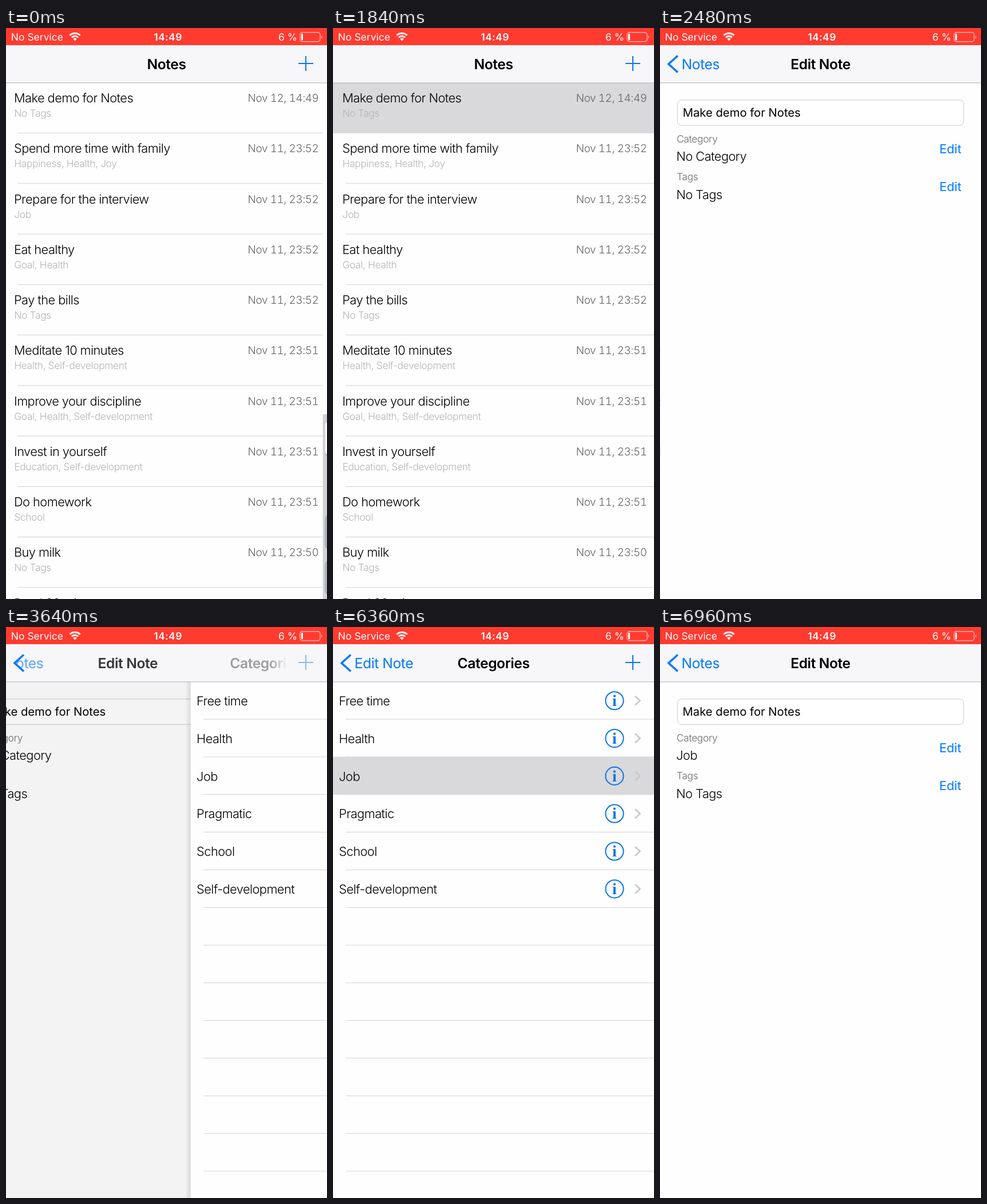
Animation, 561 px wide and 998 px high, one loop 9800 ms. Source, as an HTML page:

```html
<!DOCTYPE html>
<html lang="en">
<head>
<meta charset="utf-8">
<title>Notes demo</title>
<style>
  html, body { margin: 0; width: 100%; height: 100%; overflow: hidden; background: #fefefe; }
  svg { display: block; width: 100%; height: 100%; }
  text {
    font-family: Inter, sans-serif; font-optical-sizing: none;
    text-rendering: geometricPrecision; white-space: pre;
  }

  .light { font-size: 21.8px; font-weight: 300; letter-spacing: -.56px; }
  .small { font-size: 17.4px; letter-spacing: -.36px; }
  .tags { fill: #b4b4b6; }
  .label { fill: #6a6a6c; }
  .date {
    font-size: 18.9px; letter-spacing: -.42px; fill: #646466;
    text-anchor: end; font-variant-numeric: tabular-nums;
  }

  .title { font-size: 24.6px; font-weight: 600; letter-spacing: -.4px; text-anchor: middle; }
  .back { font-size: 24.6px; letter-spacing: -.4px; fill: #007aff; }
  .button { font-size: 21.7px; fill: #007aff; }
  .field { font-size: 20.3px; letter-spacing: -.03px; }
  .status { font-size: 17.5px; fill: #fff; }
  .clock { font-weight: 600; letter-spacing: .4px; text-anchor: middle; }
  .info { font: bold 28px "Liberation Serif", Times, serif; fill: #0a76e6; text-anchor: middle; }
  .line { fill: none; stroke: #0a76e6; stroke-width: 2; }
  .chevron { stroke: #007aff; stroke-width: 3.6; }
  .more { stroke: #c7c7cc; stroke-width: 2.6; }
</style>
</head>
<body>
<svg id="stage" viewBox="0 0 561 998" xmlns="http://www.w3.org/2000/svg"></svg>
<script>
const W = 561, H = 998, LOOP = 9800, STEP = 40;
const BAR = 95.74, NOTE_H = 88.26, CATEGORY_H = 65.82;
const PAPER = '#fefefe', PRESSED = '#d9d8da';

const notes = [
  ['Make demo for Notes', 'No Tags', '12, 14:49'],
  ['Spend more time with family', 'Happiness, Health, Joy', '11, 23:52'],
  ['Prepare for the interview', 'Job', '11, 23:52'],
  ['Eat healthy', 'Goal, Health', '11, 23:52'],
  ['Pay the bills', 'No Tags', '11, 23:52'],
  ['Meditate 10 minutes', 'Health, Self-development', '11, 23:51'],
  ['Improve your discipline', 'Goal, Health, Self-development', '11, 23:51'],
  ['Invest in yourself', 'Education, Self-development', '11, 23:51'],
  ['Do homework', 'School', '11, 23:51'],
  ['Buy milk', 'No Tags', '11, 23:50'],
  ['Read 20 minutes', 'No Tags', '11, 23:50']
];
const categories = ['Free time', 'Health', 'Job', 'Pragmatic', 'School', 'Self-development'];
const titles = [['Notes', 246], ['Edit Note', 226], ['Categories', 216]];

const text = (x, y, content, cls, attrs = '') =>
  `<text x="${x}" y="${y}" class="${cls}" ${attrs}>${content}</text>`;
const rect = (x, y, w, h, fill, attrs = '') =>
  `<rect x="${x}" y="${y}" width="${w}" height="${h}" fill="${fill}" ${attrs}/>`;
const path = (d, cls, attrs = '') => `<path d="${d}" class="${cls}" ${attrs}/>`;

// One table row: bottom separator, hidden press highlight, content.
const row = (index, height, content, id = '') =>
  `<g transform="translate(0 ${BAR + index * height})">
    ${rect(22.4, height - .8, W, .8, '#c8c7cc')}
    ${id && rect(0, -.6, W, height + .6, PRESSED, `id="${id}" opacity="0"`)}
    ${content}
  </g>`;

const noteRow = ([title, tags, date], i) => row(i, NOTE_H,
  text(16.2, 34.3, title, 'light') +
  text(16.4, 59.3, tags, 'light small tags') +
  text(548.6, 33.3, 'Nov ' + date, 'light date'), i === 0 ? 'note' : '');

const categoryRow = (name, i) => row(i, CATEGORY_H, name ?
  text(10.3, 41.2, name, 'light') +
  '<circle cx="492" cy="33" r="15.6" class="line"/>' +
  text(492, 42.3, 'i', 'info') +
  path('M528 25l8.5 8-8.5 8', 'line more') : '', name === 'Job' ? 'job' : '');

const editForm =
  rect(30.4, 125.9, 500.2, 44.4, '#fff', 'rx="7" stroke="#cbcbcd"') +
  text(39.6, 155, 'Make demo for Notes', 'field') +
  text(29, 200, 'Category', 'light small label') +
  text(28.3, 232.3, 'No Category', 'light', 'id="category"') +
  text(29, 266.3, 'Tags', 'light small label') +
  text(28.3, 299, 'No Tags', 'light') +
  text(488, 218.7, 'Edit', 'button', 'id="editCategory"') +
  text(488, 285.3, 'Edit', 'button');

const key = (y, fill) => rect(4, y + 1.5, 46, 59, '#898b90', 'rx="7"') + rect(4, y, 46, 59, fill, 'rx="7"');
const keyboard = rect(0, 675, W, 323, '#cfd2d7') +
  key(688, '#fff') + key(850, '#abb0ba') + key(930, '#abb0ba');

const screen = (id, content) =>
  `<g id="${id}">
    ${rect(-10, BAR, 10, H, 'url(#shade)', 'class="shadow"')}
    ${rect(0, BAR, W, H, PAPER)}${content}
    ${rect(0, BAR, W, H, '#000', 'class="dim"')}
  </g>`;

const arc = r => {
  const dx = r * Math.sin(.75), y = 22.5 - r * Math.cos(.75);
  return `M${120.5 - dx} ${y}A${r} ${r} 0 0 1 ${120.5 + dx} ${y}`;
};
const statusBar = rect(0, 0, W, 30, '#ff3b30') +
  text(8.8, 22, 'No Service', 'status') +
  path(arc(13.3) + arc(8.2), '', 'fill="none" stroke="#fff" stroke-width="3"') +
  path(arc(4.8) + 'L120.5 22.5z', '', 'fill="#fff"') +
  text(283, 22, '14:49', 'status clock') +
  text(476, 22, '6 %', 'status') +
  rect(514, 7.8, 35, 16, 'none', 'rx="4" stroke="#fff" stroke-opacity=".6" stroke-width="1.4"') +
  rect(516, 10, 3, 11.6, '#fff', 'rx="1"') +
  path('M551 13q3 3 0 6z', '', 'fill="#fff" opacity=".6"');

const navBar = rect(0, 30, W, 66, '#f7f6f8') + rect(0, 95.4, W, 1, '#b2b2b4') +
  '<g mask="url(#titleArea)">' +
  titles.map(([name], i) => text(280.5, 72, name, 'title', `id="title${i}"`)).join('') + '</g>' +
  '<g clip-path="url(#backArea)">' +
  titles.slice(0, 2).map(([name], i) => text(37.6, 72, name, 'back', `id="back${i}"`)).join('') + '</g>' +
  path('M31 48.5L15 63l16 14.5', 'line chevron', 'id="chevron"') +
  path('M511 62h26M524 49v26', 'line', 'id="plus"');

document.getElementById('stage').innerHTML = `
  <defs>
    <linearGradient id="shade"><stop stop-opacity="0"/><stop offset="1" stop-opacity=".25"/></linearGradient>
    <linearGradient id="fade" gradientUnits="userSpaceOnUse" x1="462" x2="492">
      <stop stop-color="#fff"/><stop offset="1" stop-color="#000"/>
    </linearGradient>
    <mask id="titleArea" maskUnits="userSpaceOnUse" x="0" y="30" width="561" height="66">
      ${rect(0, 30, W, 66, 'url(#fade)')}
    </mask>
    <clipPath id="backArea"><path d="M15 63L32 48V30H561V96H32V78z"/></clipPath>
  </defs>` +
  screen('screen0', notes.map(noteRow).join('')) +
  screen('screen1', editForm) +
  screen('screen2', [...categories, ...Array(8).fill('')].map(categoryRow).join('')) +
  screen('sheet', keyboard) + navBar + statusBar;

const el = id => document.getElementById(id);
const clamp = v => Math.min(1, Math.max(0, v));

// Critically damped spring, from 0 to 1 in about 600 ms.
function spring(ms) {
  const u = Math.max(0, ms) * .0181;
  return 1 - (1 + u) * Math.exp(-u);
}

// Navigation depth: 0 list, 1 edit form, 2 categories.
const depthAt = t => spring(t - 1880) + spring(t - 3560) - spring(t - 6360);

function place(id, x, opacity = 1) {
  el(id).setAttribute('transform', `translate(${x.toFixed(2)} 0)`);
  el(id).setAttribute('opacity', clamp(opacity).toFixed(3));
}

// lead > 0: partly covered by the next screen; lead < 0: still entering.
function placeScreen(id, lead) {
  place(id, lead < 0 ? -lead * W : -lead * .3 * W);
  el(id).querySelector('.shadow').setAttribute('opacity', clamp(1 + lead));
  el(id).querySelector('.dim').setAttribute('opacity', clamp(lead) * .1);
}

function placeNav(depth) {
  titles.forEach(([, left], i) => {
    const lead = depth - i;
    if (lead < 0) place('title' + i, -lead * (488 - left), 1 + lead);
    else place('title' + i, -lead * (left - 39), 1 - lead ** 1.5);
    if (i > 1) return;
    const backLead = lead - 1;
    if (backLead < 0) place('back' + i, -backLead * (left - 39), clamp(1 + backLead) ** 4);
    else place('back' + i, -backLead * 107, 1 - backLead);
  });
  place('chevron', 0, depth);
  place('plus', 0, 1.3 * Math.abs(depth - 1));
}

function draw(t) {
  const depth = depthAt(t), closing = 1 - spring(t + 350);
  placeScreen('screen0', depth + closing);
  placeScreen('screen1', depth - 1);
  placeScreen('screen2', depth - 2);
  placeScreen('sheet', closing - 1);
  placeNav(depthAt(t - 10));
  el('note').setAttribute('opacity', +(t >= 1840));
  el('job').setAttribute('opacity', +(t >= 6360));
  el('category').textContent = t >= 6360 ? 'Job' : 'No Category';
  el('editCategory').setAttribute('opacity', t < 3400 || t > 4000 ? 1 : t < 3440 ? .3 : .2);
}

const start = performance.now();
function tick() {
  const t = (performance.now() - start + 2) % LOOP;
  draw(Math.floor(t / STEP) * STEP);
  requestAnimationFrame(tick);
}
tick();
</script>
</body>
</html>
```
